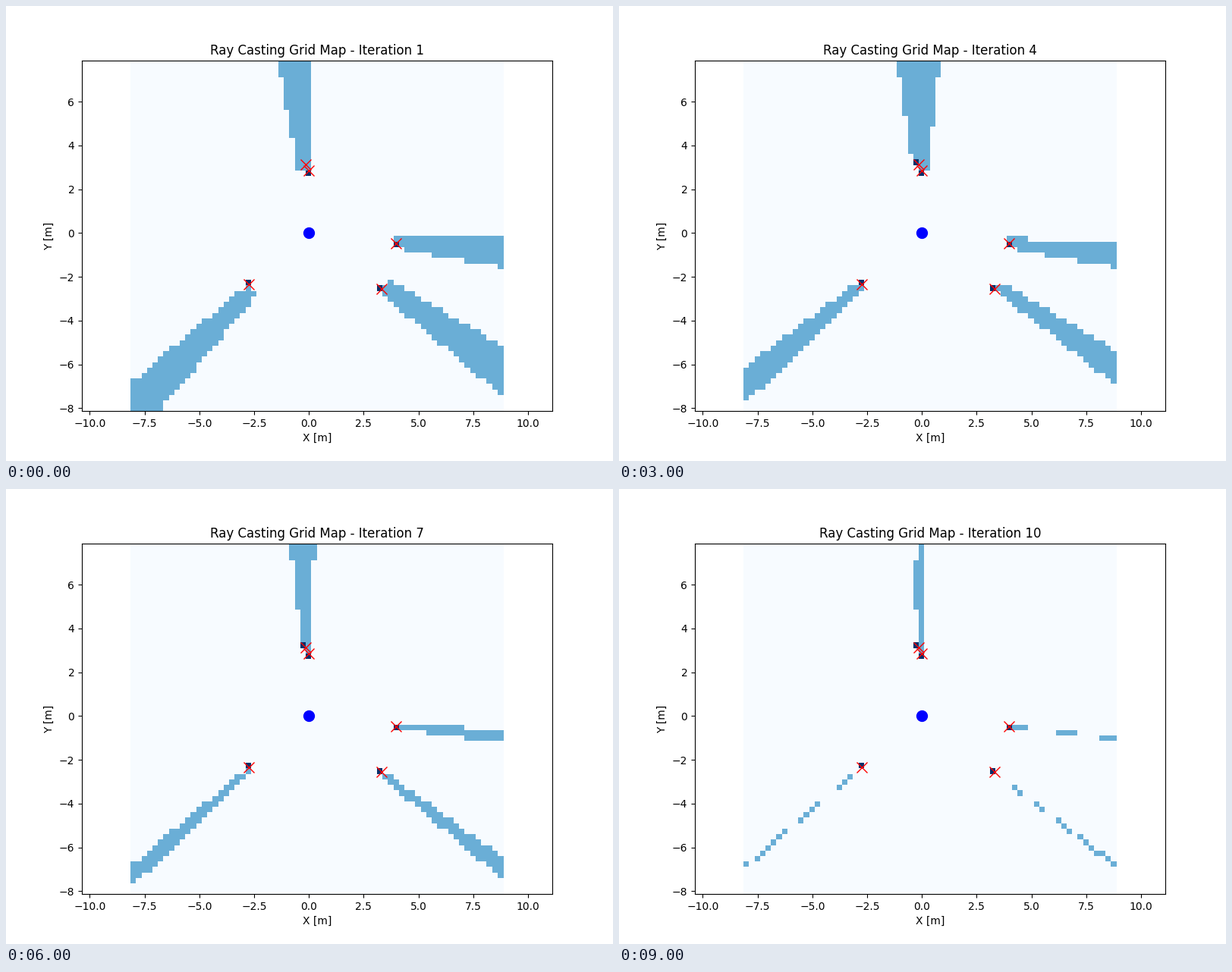
These frames come from a looping animation (800x600 px, 10000 ms). A matplotlib script:

```python
import math

import matplotlib.pyplot as plt
import numpy as np
from matplotlib.animation import FuncAnimation

CELL = 0.25
MIN_X, MAX_X = -8, 9
MIN_Y, MAX_Y = -8, 8
ITERATIONS = 10
OBSTACLES = [(-0.14, 3.14), (-0.01, 2.84), (3.97, -0.47),
             (-2.74, -2.34), (3.325, -2.55)]


def full_angle(y, x):
    """Angle of (x, y) in the range 0 to 2 pi."""
    angle = math.atan2(y, x)
    return angle + 2 * math.pi if angle < 0 else angle


xs = np.arange(MIN_X, MAX_X, CELL)
ys = np.arange(MIN_Y, MAX_Y, CELL)
angles = np.array([[full_angle(y, x) for y in ys] for x in xs])
dists = np.hypot(xs[:, None], ys[None, :])


def cast_rays(yaw_step):
    """Occupancy grid: 0 free, 0.5 hidden behind an obstacle, 1 occupied."""
    grid = np.zeros(dists.shape)
    sectors = np.floor(angles / yaw_step)
    for x, y in OBSTACLES:
        sector = math.floor(full_angle(y, x) / yaw_step)
        grid[(sectors == sector) & (dists > math.hypot(x, y))] = 0.5
        grid[round((x - MIN_X) / CELL), round((y - MIN_Y) / CELL)] = 1.0
    return grid


def edges(low, high):
    return np.arange(low, high + CELL, CELL) - CELL / 2


fig, ax = plt.subplots(figsize=(8, 6), dpi=100)
fig.subplots_adjust(left=0.125, right=0.9, bottom=0.11, top=0.88)

edge_x, edge_y = np.meshgrid(edges(MIN_X, MAX_X), edges(MIN_Y, MAX_Y),
                             indexing="ij")
cells = ax.pcolor(edge_x, edge_y, cast_rays(np.deg2rad(10.0)),
                  vmin=0.0, vmax=1.0, cmap="Blues")
ax.plot(*zip(*OBSTACLES), "xr", markersize=10)
ax.plot(0.0, 0.0, "ob", markersize=10)

# Equal scale on both axes: the height fits the grid, the width follows.
mid_x = (edge_x.min() + edge_x.max()) / 2
half_width = (edge_y.max() - edge_y.min()) / 2 * 620 / 462
ax.set_xlim(mid_x - half_width, mid_x + half_width)
ax.set_ylim(edge_y.min(), edge_y.max())
ax.set_xlabel("X [m]")
ax.set_ylabel("Y [m]")
title = ax.set_title("")


def update(i):
    # The angular resolution sharpens by one degree per iteration.
    cells.set_array(cast_rays(np.deg2rad(10.0 - i)))
    title.set_text(f"Ray Casting Grid Map - Iteration {i + 1}")
    return cells, title


anim = FuncAnimation(fig, update, frames=ITERATIONS, interval=1000,
                     repeat=True, repeat_delay=0, blit=False)
plt.show()
```
